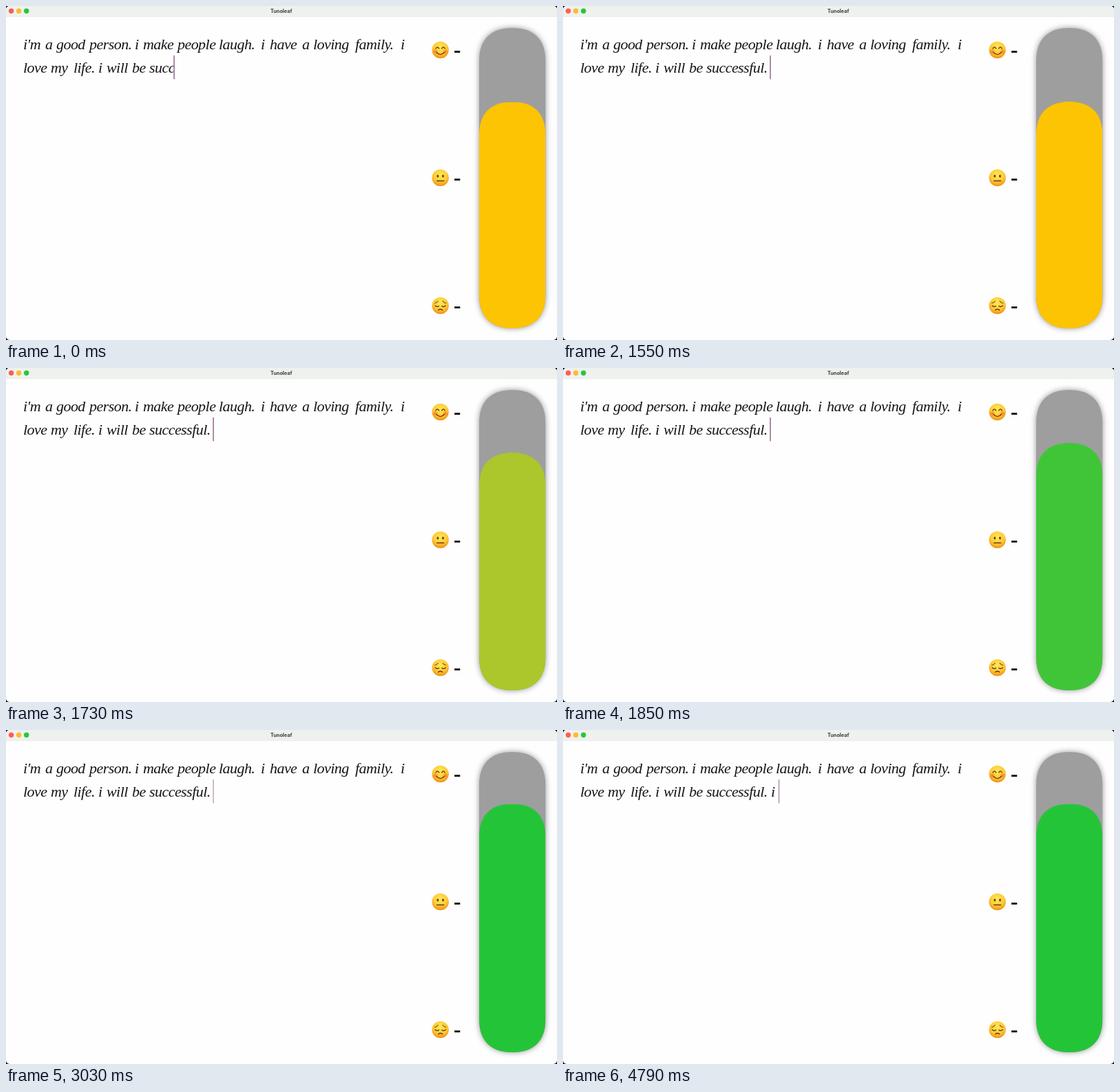
An HTML page that plays this animation: 800 by 486 pixels, repeating every 5.09 s.

```html
<!DOCTYPE html>
<html lang="en">
<head>
<meta charset="utf-8">
<title>Tunoleaf</title>
<style>
  html, body { margin: 0; width: 100%; height: 100%; overflow: hidden; background: #000; }
  svg { display: block; width: 800px; height: 486px; }

  .title { font: 700 7.3px Inter, sans-serif; fill: #3c3d3c; text-anchor: middle; }
  .note { font: italic 22px "Liberation Serif", serif; letter-spacing: -.55px; fill: #161616; }
  .line { fill: none; stroke: #6b3a05; stroke-width: 1.4; stroke-linecap: round; }
  .bar { filter: drop-shadow(0 0 4px rgba(0, 0, 0, .42)); }

  .level, .cursor, .caret { animation: 5090ms linear infinite; }
  .level { animation-name: rise; fill: currentColor; }
  .cursor { animation-name: type; animation-timing-function: step-end; }
  .caret { animation-name: blink; }

  /* color() values blend perceptually, through a bright olive */
  @keyframes rise {
    0% { transform: translateY(107.5px); color: color(srgb .992 .769 .012); }
    30.45% {
      transform: translateY(107.5px);
      color: color(srgb .992 .769 .012);
      animation-timing-function: ease-in-out;
    }
    37.52%, 100% { transform: translateY(75.5px); color: color(srgb .141 .769 .224); }
  }
  @keyframes type {
    0% { transform: translateX(244px); }
    3.93% { transform: translateX(253.5px); }
    8.84% { transform: translateX(261.5px); }
    12.18% { transform: translateX(269.5px); }
    14.15% { transform: translateX(276px); }
    16.11% { transform: translateX(285.5px); }
    19.65% { transform: translateX(291px); }
    23.18% { transform: translateX(296.5px); }
    27.5% { transform: translateX(301px); }
    70.33% { transform: translateX(308.5px); }
    74.46%, 100% { transform: translateX(313.5px); }
  }
  @keyframes blink {
    0%, 46.95% { opacity: 1; }
    50.49%, 58.74% { opacity: 0; }
    60.12%, 85.07% { opacity: 1; }
    89.39%, 94.09% { opacity: 0; }
    94.1%, 100% { opacity: .75; }
  }
</style>
</head>
<body>
<svg viewBox="0 0 800 486">
  <defs>
    <radialGradient id="skin" cx=".5" cy=".34" r=".66">
      <stop offset="0" stop-color="#ffe95c"/>
      <stop offset=".6" stop-color="#fecb36"/>
      <stop offset="1" stop-color="#f08f16"/>
    </radialGradient>
    <radialGradient id="blush">
      <stop offset="0" stop-color="#f4592c" stop-opacity=".75"/>
      <stop offset="1" stop-color="#f4592c" stop-opacity="0"/>
    </radialGradient>
    <path id="pill" d="M735 32H735.3C766.5 32 783.3 48.8 783.3 80V421C783.3 452.2 766.5 469 735.3 469H735C703.8 469 687 452.2 687 421V80C687 48.8 703.8 32 735 32Z"/>
    <clipPath id="tube"><use href="#pill"/></clipPath>
    <clipPath id="window"><rect width="800" height="486" rx="5"/></clipPath>
    <g id="face">
      <circle r="12.2" fill="url(#skin)"/>
      <rect x="20.4" y="1.2" width="8.2" height="2.8" fill="#111"/>
    </g>
  </defs>

  <g clip-path="url(#window)">
    <rect width="800" height="486" fill="#fefefe"/>
    <rect width="800" height="15" fill="#eef1ee"/>
    <rect y="15" width="800" height=".6" fill="#e3e5e3"/>
    <circle cx="7.6" cy="7.2" r="3.7" fill="#fe5d55"/>
    <circle cx="18.6" cy="7.2" r="3.7" fill="#febb2d"/>
    <circle cx="29.7" cy="7.2" r="3.7" fill="#27c63f"/>
    <text class="title" x="399.7" y="9.8">Tunoleaf</text>

    <text class="note" y="63">
      <tspan x="25">i'm</tspan> <tspan x="57">a</tspan> <tspan x="73">good</tspan>
      <tspan x="121">person.</tspan> <tspan x="187">i</tspan> <tspan x="199">make</tspan>
      <tspan x="249">people</tspan> <tspan x="309">laugh.</tspan> <tspan x="370">i</tspan>
      <tspan x="383">have</tspan> <tspan x="430">a</tspan> <tspan x="446">loving</tspan>
      <tspan x="507">family.</tspan> <tspan x="573">i</tspan>
    </text>
    <text class="note" y="97">
      <tspan x="25">love</tspan> <tspan x="65">my</tspan> <tspan x="98">life.</tspan>
      <tspan x="134">i</tspan> <tspan x="146">will</tspan> <tspan x="183">be</tspan>
      <tspan x="208">successful.</tspan> <tspan x="302">i</tspan>
    </text>
    <!-- hides what is not typed yet -->
    <g class="cursor">
      <rect y="72" width="120" height="35" fill="#fefefe"/>
      <rect class="caret" x="-.6" y="72" width="1.3" height="34.5" fill="#84507f"/>
    </g>

    <g transform="translate(630.7 64)">
      <use href="#face"/>
      <circle cx="-7.3" cy="2.2" r="4.2" fill="url(#blush)"/>
      <circle cx="7.3" cy="2.2" r="4.2" fill="url(#blush)"/>
      <path class="line" d="M-6.6-2.2Q-4.3-6-2-2.2M2-2.2Q4.3-6 6.6-2.2M-5.6 3.6Q0 9.6 5.6 3.6"/>
    </g>
    <g transform="translate(630.7 250)">
      <use href="#face"/>
      <ellipse cx="-3.8" cy="-2.5" rx="1.4" ry="2.1" fill="#6b3a05"/>
      <ellipse cx="3.8" cy="-2.5" rx="1.4" ry="2.1" fill="#6b3a05"/>
      <path class="line" d="M-5 4.5H5"/>
    </g>
    <g transform="translate(630.7 436)">
      <use href="#face"/>
      <path class="line" d="M-8-3.6Q-5.4-4.2-3.6-6.4M8-3.6Q5.4-4.2 3.6-6.4" opacity=".75"/>
      <path class="line" d="M-7.6 0Q-4.8 2.8-2.2 .4M7.6 0Q4.8 2.8 2.2 .4M-3 6.4Q0 4.2 3 6.4"/>
    </g>

    <use class="bar" href="#pill" fill="#9e9e9e"/>
    <g clip-path="url(#tube)"><use class="level" href="#pill"/></g>
  </g>
</svg>
</body>
</html>
```
